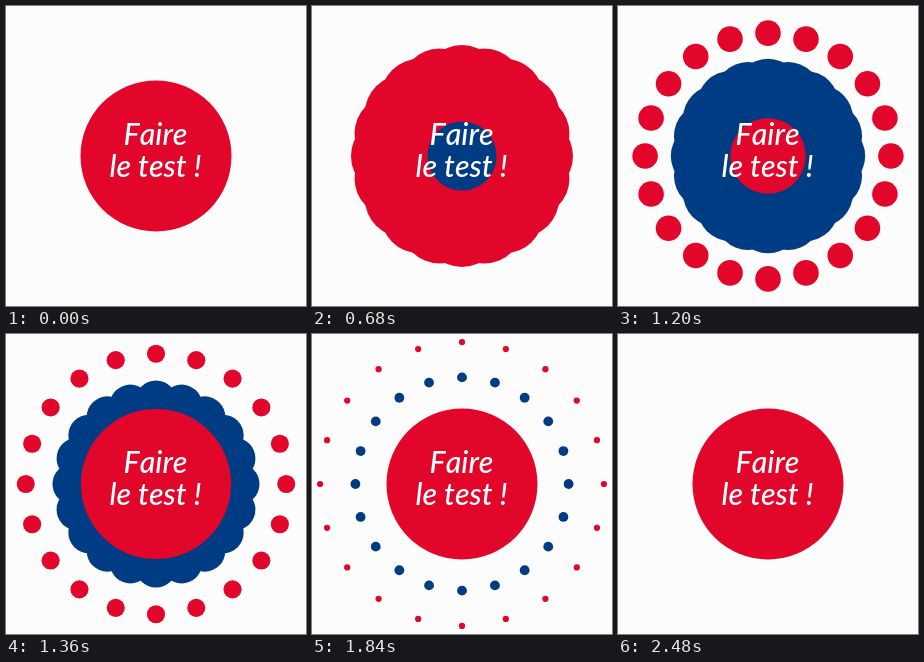
Write an HTML page with a canvas that moves like this. It is 300 by 300 pixels and loops after 3040 ms.

```html
<!DOCTYPE html>
<html lang="fr">
<head>
<meta charset="utf-8">
<style>
  html, body { margin: 0; width: 100%; height: 100%; overflow: hidden; background: #fcfcfc; }
  canvas { display: block; width: 300px; height: 300px; }
</style>
</head>
<body>
<canvas id="stage"></canvas>
<script>
const LOOP = 3040, STEP = 40, START = 80, END = 2480;
const RED = '#e1062a', BLUE = '#003c84', PAPER = '#fcfcfc';
const CENTER = 150, RADIUS = 75.5, DOTS = 20;

const redBurst = { color: RED, start: 364, soft: 90, rate: 0.0021, reach: 148 };
const blueBurst = { color: BLUE, start: 916, soft: 50, rate: 0.0029, reach: 114 };

const canvas = document.getElementById('stage');
const ctx = canvas.getContext('2d');
const ratio = window.devicePixelRatio || 1;
canvas.width = canvas.height = 300 * ratio;

function disc(x, y, r, color) {
  if (r <= 0) return;
  ctx.fillStyle = color;
  ctx.beginPath();
  ctx.arc(x, y, r, 0, Math.PI * 2);
  ctx.fill();
}

function grow(t, from) {
  const u = Math.min(1, Math.max(0, (t - from) / 350));
  return RADIUS * u * u * (3 - 2 * u);
}

// Full-size discs drift outward while shrinking, with a soft start and a long tail.
function drawBurst(t, { color, start, soft, rate, reach }) {
  const elapsed = soft * Math.log1p(Math.exp((t - start) / soft));
  const left = Math.max(0, (Math.exp(-rate * elapsed) - 0.004) / 0.996);
  const distance = reach * (1 - left);
  for (let i = 0; i < DOTS; i++) {
    const angle = i * 2 * Math.PI / DOTS;
    disc(CENTER + distance * Math.cos(angle), CENTER + distance * Math.sin(angle),
      RADIUS * left, color);
  }
}

function pulse(t, peak) {
  return 0.045 * Math.exp(-(((t - peak) / 90) ** 2) / 2);
}

function drawLabel(scale) {
  ctx.save();
  ctx.translate(CENTER, CENTER);
  ctx.scale(scale, scale);
  ctx.fillStyle = '#fff';
  ctx.font = 'italic 500 30.4px Lato, sans-serif';
  ctx.fontKerning = 'none';
  ctx.textAlign = 'center';
  ctx.fillText('Faire', -0.5, -10.7);
  ctx.fillText('le test !', -0.5, 21.3);
  ctx.restore();
}

function draw(t) {
  ctx.setTransform(ratio, 0, 0, ratio, 0, 0);
  ctx.fillStyle = PAPER;
  ctx.fillRect(0, 0, 300, 300);

  if (t < START || t >= END) {
    disc(CENTER, CENTER, RADIUS, RED);
    drawLabel(1);
    return;
  }

  drawBurst(t, redBurst);
  if (t < 700) disc(CENTER, CENTER, RADIUS, RED);

  const blueRadius = grow(t, 515);
  if (t < 865) disc(CENTER, CENTER, blueRadius, BLUE);
  else {
    drawBurst(t, blueBurst);
    if (t < 1220) disc(CENTER, CENTER, blueRadius, BLUE);
  }

  disc(CENTER, CENTER, grow(t, 1025), RED);
  drawLabel(1 + pulse(t, 445) + pulse(t, 965));
}

const origin = performance.now();
function tick() {
  const t = (performance.now() - origin) % LOOP;
  draw(Math.floor(t / STEP) * STEP);
  requestAnimationFrame(tick);
}
tick();
</script>
</body>
</html>
```
